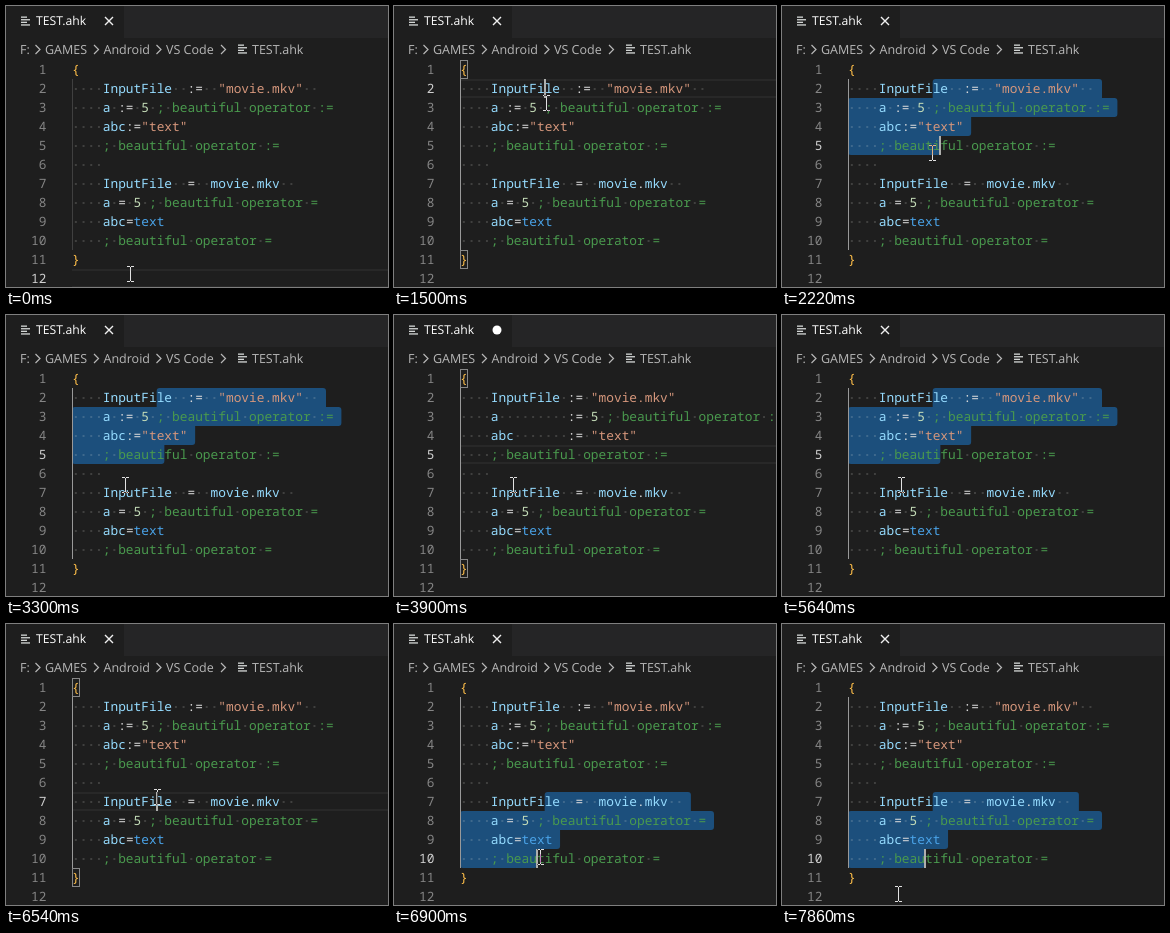
These frames come from a looping animation (382x281 px, 8 s). An HTML page:

```html
<!DOCTYPE html>
<html lang="en">
<head>
<meta charset="utf-8">
<title>Editor</title>
<style>
  html, body { margin: 0; width: 100%; height: 100%; overflow: hidden; background: #1e1e1e; }
  svg { display: block; width: 382px; height: 281px; }
  text { white-space: pre; text-rendering: geometricPrecision; }
  .code text { font: 500 12.83px "Noto Sans Mono", "DejaVu Sans Mono", monospace; }
  .ui text { font: 12.5px "Open Sans", "Noto Sans", sans-serif; fill: #b8b8b8; }
  .ui .title { font-weight: 500; font-size: 12.2px; fill: #fff; }
  .v { fill: #96dcff; }
  .o { fill: #dcdcdc; }
  .n { fill: #c4dcb8; }
  .s { fill: #d6977c; }
  .c { fill: #4a9a4e; }
  .k { fill: #4aa3e8; }
  .b { fill: #ffbf4a; }
  .dot { fill: rgba(227, 228, 226, .17); }
  .num { fill: #858585; }
  .num.on { fill: #d0d0d0; }
  #beam { fill: #fff; mix-blend-mode: difference; }
</style>
</head>
<body>
<svg viewBox="0 0 382 281" xmlns="http://www.w3.org/2000/svg">
  <rect width="382" height="281" fill="#1e1e1e"/>
  <g class="ui" id="ui">
    <rect x="118" width="264" height="32" fill="#252526"/>
    <text class="title" x="30" y="19">TEST.ahk</text>
    <path id="close" d="M99 11l8 8m0-8l-8 8" stroke="#f0f0f0" stroke-width="1.4"/>
    <circle id="dirty" cx="103" cy="15" r="4.5" fill="#fff"/>
  </g>
  <g id="line" fill="#282828">
    <rect x="66" width="316" height="2"/>
    <rect x="66" y="17" width="316" height="2"/>
  </g>
  <path id="sel" fill="#1c4f7c"/>
  <rect id="guide" x="66" y="73" width="1" height="171"/>
  <g id="boxes" fill="none" stroke="#888">
    <rect x="66.5" y="54.5" width="7" height="18"/>
    <rect x="66.5" y="244.5" width="7" height="18"/>
  </g>
  <g class="code" id="nums"></g>
  <g class="code" id="loose"></g>
  <g class="code" id="neat"></g>
  <rect id="caret" width="2" height="19" fill="#aeafad"/>
  <path id="beam" d="M-3-8h3v1h1v-1h3v1h-3v14h3v1h-3v-1h-1v1h-3v-1h3v-14h-3z"/>
</svg>
<script>
const LOOP = 8000, TICK = 60, BLINK = 480;
const LEFT = 66, TOP = 54, ROW = 19, CHAR = 7.697;
const $ = id => document.getElementById(id);
const colX = col => LEFT + col * CHAR;
const rowY = row => TOP + (row - 1) * ROW;

function add(parent, tag, attrs, text) {
  const el = document.createElementNS("http://www.w3.org/2000/svg", tag);
  for (const key in attrs) el.setAttribute(key, attrs[key]);
  if (text) el.textContent = text;
  return parent.appendChild(el);
}

// Each line is a list of "class:text" tokens
const note = op => "c:; beautiful operator " + op;
const loose = [
  ["b:{"],
  ["o:    ", "v:InputFile", "o:  :=  ", 's:"movie.mkv"', "o:  "],
  ["o:    ", "v:a", "o: := ", "n:5", "o: ", note(":=")],
  ["o:    ", "v:abc", "o::=", 's:"text"'],
  ["o:    ", note(":=")],
  ["o:    "],
  ["o:    ", "v:InputFile", "o:  =  ", "v:movie", "o:.", "v:mkv", "o:  "],
  ["o:    ", "v:a", "o: = ", "n:5", "o: ", note("=")],
  ["o:    ", "v:abc", "o:=", "k:text"],
  ["o:    ", note("=")],
  ["b:}"],
  []
];
const neat = loose.slice();
neat[1] = ["o:    ", "v:InputFile", "o: := ", 's:"movie.mkv"'];
neat[2] = ["o:    ", "v:a", "o:         := ", "n:5", "o: ", note(":=")];
neat[3] = ["o:    ", "v:abc", "o:       := ", 's:"text"'];

function drawCode(group, lines) {
  lines.forEach((tokens, i) => {
    const y = rowY(i + 1);
    let col = 0;
    for (const token of tokens) {
      const text = token.slice(2);
      for (const word of text.matchAll(/\S+/g))
        add(group, "text", { class: token[0], x: colX(col + word.index), y: y + 14 }, word[0]);
      for (const gap of text.matchAll(/ /g))
        add(group, "rect", { class: "dot", x: colX(col + gap.index + .5) - 1, y: y + 9, width: 2, height: 2 });
      col += text.length;
    }
  });
}
drawCode($("loose"), loose);
drawCode($("neat"), neat);

const ends = loose.map(tokens => tokens.reduce((sum, t) => sum + t.length - 2, 0));
const nums = loose.map((_, i) =>
  add($("nums"), "text", { x: 40.4, y: rowY(i + 1) + 14, "text-anchor": "end" }, String(i + 1)));

function fileIcon(x, y) {
  for (let i = 0; i < 4; i++)
    add($("ui"), "rect", { x, y: y + i * 2.6, width: i % 2 ? 9 : 6, height: 1.3, fill: "#d4d7d6" });
}
fileIcon(15, 10.5);
fileIcon(232, 38.5);
[[14, "F:"], [39, "GAMES"], [97.5, "Android"], [160, "VS Code"], [246, "TEST.ahk"]]
  .forEach(([x, name], i) => {
    add($("ui"), "text", { x, y: 47.5 }, name);
    const arrow = i < 4 ? x - 9.5 : 217;
    if (i) add($("ui"), "path", {
      d: `M${i < 4 ? arrow : 215} 39l4.5 4.5l-4.5 4.5`, fill: "none", stroke: "#b8b8b8", "stroke-width": 1.2
    });
  });

// Pointer moves: start, end, target x, target y
const moves = [
  [60, 720, 152, 70], [840, 1140, 151, 83], [1380, 1920, 157, 147], [2160, 2220, 150, 147],
  [2220, 2580, 119, 170], [5640, 6360, 151, 173], [6540, 6840, 146, 233], [7200, 7860, 116, 270]
];

function mouseAt(t) {
  let x = 124, y = 268;
  for (const [from, to, tx, ty] of moves) {
    const k = Math.min(1, Math.max(0, (t - from) / (to - from)));
    x += (tx - x) * k;
    y += (ty - y) * k;
  }
  return [Math.round(x), Math.round(y)];
}

// The caret either has a fixed place or follows a drag from an anchor row;
// it starts blinking at "idle"
const START_COL = 11;
const phases = [
  { at: 0, idle: -780, row: 12, col: 0 },
  { at: 1380, idle: 1860, anchor: 2, release: 1860 },
  { at: 3360, idle: 3420, row: 5, col: 27, tidy: true },
  { at: 5160, idle: 5160, anchor: 2, release: 1860 },
  { at: 6540, idle: 6900, anchor: 7, release: 6900 }
];

function caretAt(phase, t) {
  if (!phase.anchor) return [phase.row, phase.col];
  const [x, y] = mouseAt(Math.min(t, phase.release) - TICK);
  return [Math.floor((y - TOP) / ROW) + 1, Math.round((x - LEFT) / CHAR)];
}

// Selection outline: corners are round only where no neighbouring row covers them
function selection(first, last, col) {
  const rows = [];
  for (let r = first; r <= last; r++)
    rows.push({
      y: rowY(r),
      a: r === first ? colX(START_COL) : LEFT,
      b: colX(r === last ? col : ends[r - 1] + 1)
    });
  const radius = (row, x) => row && row.a <= x && x <= row.b ? 0 : 3;
  return rows.map(({ y, a, b }, i) => {
    const up = rows[i - 1], down = rows[i + 1], z = y + ROW;
    const p = radius(up, a), q = radius(up, b), r = radius(down, b), s = radius(down, a);
    return `M${a + p} ${y}H${b - q}Q${b} ${y} ${b} ${y + q}V${z - r}Q${b} ${z} ${b - r} ${z}` +
      `H${a + s}Q${a} ${z} ${a} ${z - s}V${y + p}Q${a} ${y} ${a + p} ${y}Z`;
  }).join("");
}

const show = (id, on) => $(id).setAttribute("visibility", on ? "visible" : "hidden");

function draw(time) {
  const t = Math.floor(time / TICK) * TICK;
  const phase = phases.filter(p => p.at <= t).pop();
  const [row, col] = caretAt(phase, t);
  const selected = phase.anchor && (row !== phase.anchor || col !== START_COL);
  const inside = row > 1 && row < 11;
  const unsaved = t >= 3420 && t < 5220;

  show("loose", !phase.tidy);
  show("neat", phase.tidy);
  show("dirty", unsaved);
  show("close", !unsaved);
  show("line", !selected);
  show("boxes", inside && !selected);
  show("caret", t < phase.idle || Math.floor((t - phase.idle) / BLINK) % 2 === 0);

  $("line").setAttribute("transform", `translate(0 ${rowY(row)})`);
  $("sel").setAttribute("d", selected ? selection(phase.anchor, row, col) : "");
  $("guide").setAttribute("fill", inside ? "#999" : "#404040");
  $("caret").setAttribute("x", Math.max(LEFT, Math.floor(colX(col) - .5)));
  $("caret").setAttribute("y", rowY(row));
  $("beam").setAttribute("transform", `translate(${mouseAt(t).join(" ")})`);
  nums.forEach((el, i) => el.setAttribute("class", i + 1 === row ? "num on" : "num"));
}

const start = performance.now();
function frame() {
  draw((performance.now() - start) % LOOP);
  requestAnimationFrame(frame);
}
frame();
</script>
</body>
</html>
```
